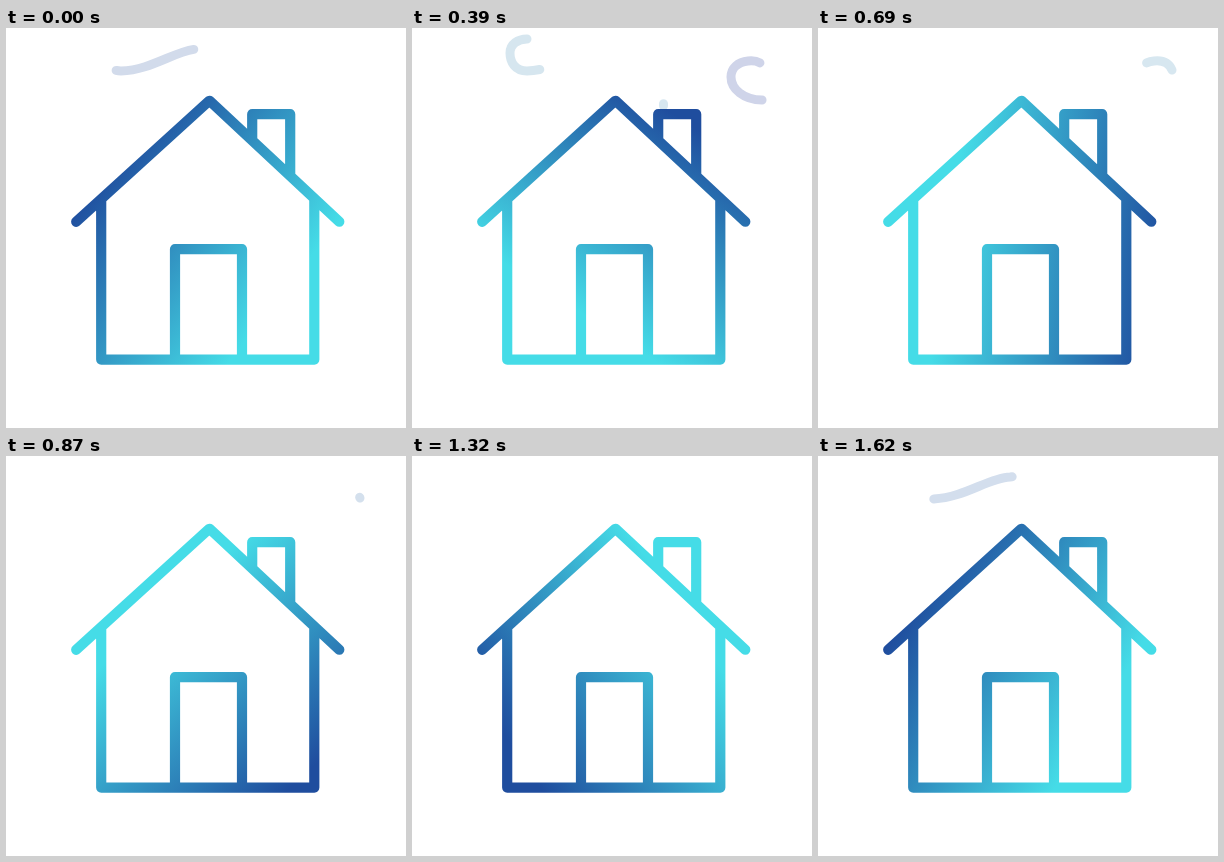
Write an HTML page that moves like this. It is 400 px wide and 400 px high and loops after 1.65 s.

```html
<!DOCTYPE html>
<html lang="en">
<head>
<meta charset="utf-8">
<title>House</title>
<style>
  html, body { margin: 0; height: 100%; overflow: hidden; background: #fff; }
  svg { display: block; width: 100%; height: 100%; }
  path { fill: none; stroke-linecap: round; stroke-linejoin: round; }
  .smoke path { stroke-width: 9; }
  .house { stroke: url(#tint); stroke-width: 10.2; }
</style>
</head>
<body>
<svg viewBox="0 0 400 400">
  <defs>
    <linearGradient id="tint" gradientUnits="userSpaceOnUse">
      <stop offset="0" stop-color="#1f4d9e"/>
      <stop offset="1" stop-color="#45dce7"/>
    </linearGradient>
  </defs>
  <g class="smoke">
    <path id="left" d="M252 77C252 42 226 18 192 21C170 22 146 42 115 43C103 43 98 34 98 25C98 16 106 11 115 11"/>
    <path id="right" d="M256 77C258 40 290 12 330 11C352 10 372 16 377 33C383 55 372 72 350 72C332 72 319 61 319 49C319 40 326 34 336 33C345 32 351 35 354 42"/>
    <path id="wisp" d="M251.5 78V58"/>
  </g>
  <path class="house" d="M95.2 172V331.6H308.3V172M70.2 193.8L203 73M203.6 72.8L333.3 193.7M169 331.6V221.2H236V331.6M246.2 110V86.2H284.2V146"/>
</svg>
<script>
  const LOOP = 1650, STEP = 30;
  const CENTER = { x: 212, y: 215 }, DARK = 135, LIGHT = -82;
  const PALE = [215, 232, 240], DEEP = [207, 212, 233];
  const $ = id => document.getElementById(id);
  const ease = (age, { span, power }) => Math.min(1, age / span) ** power;

  // Both ends of a puff run along its path and slow down
  const puffs = [
    { el: $('left'), start: 1400, life: 770,
      head: { span: 640, power: .253 }, tail: { span: 1217, power: .533 } },
    { el: $('right'), start: 30, life: 850,
      head: { span: 510, power: .095 }, tail: { span: 850, power: .4 } },
    { el: $('wisp'), start: 370, life: 180,
      head: { span: 180, power: 1 }, tail: { span: 180, power: 2 } }
  ];
  for (const p of puffs) p.length = p.el.getTotalLength();

  function drawPuff({ el, start, life, length, head, tail }, t) {
    const age = (t - start + LOOP) % LOOP;
    const from = length * ease(age, tail), size = length * ease(age, head) - from;
    const shown = age < life && size > .3;
    el.style.display = shown ? '' : 'none';
    if (!shown) return;
    const depth = Math.cos(Math.PI * (age - 380) / 640) ** 2;
    el.style.strokeDasharray = `${size} 9999`;
    el.style.strokeDashoffset = -from;
    el.style.stroke = `rgb(${PALE.map((c, i) => Math.round(c + (DEEP[i] - c) * depth))})`;
  }

  function turnTint(t) {
    const a = 2 * Math.PI * t / LOOP - .91;
    const put = (n, r) => {
      $('tint').setAttribute('x' + n, CENTER.x + r * Math.sin(a));
      $('tint').setAttribute('y' + n, CENTER.y - r * Math.cos(a));
    };
    put(1, DARK);
    put(2, LIGHT);
  }

  function draw() {
    const t = Math.floor(performance.now() % LOOP / STEP) * STEP;
    turnTint(t);
    puffs.forEach(p => drawPuff(p, t));
    requestAnimationFrame(draw);
  }
  draw();
</script>
</body>
</html>
```
